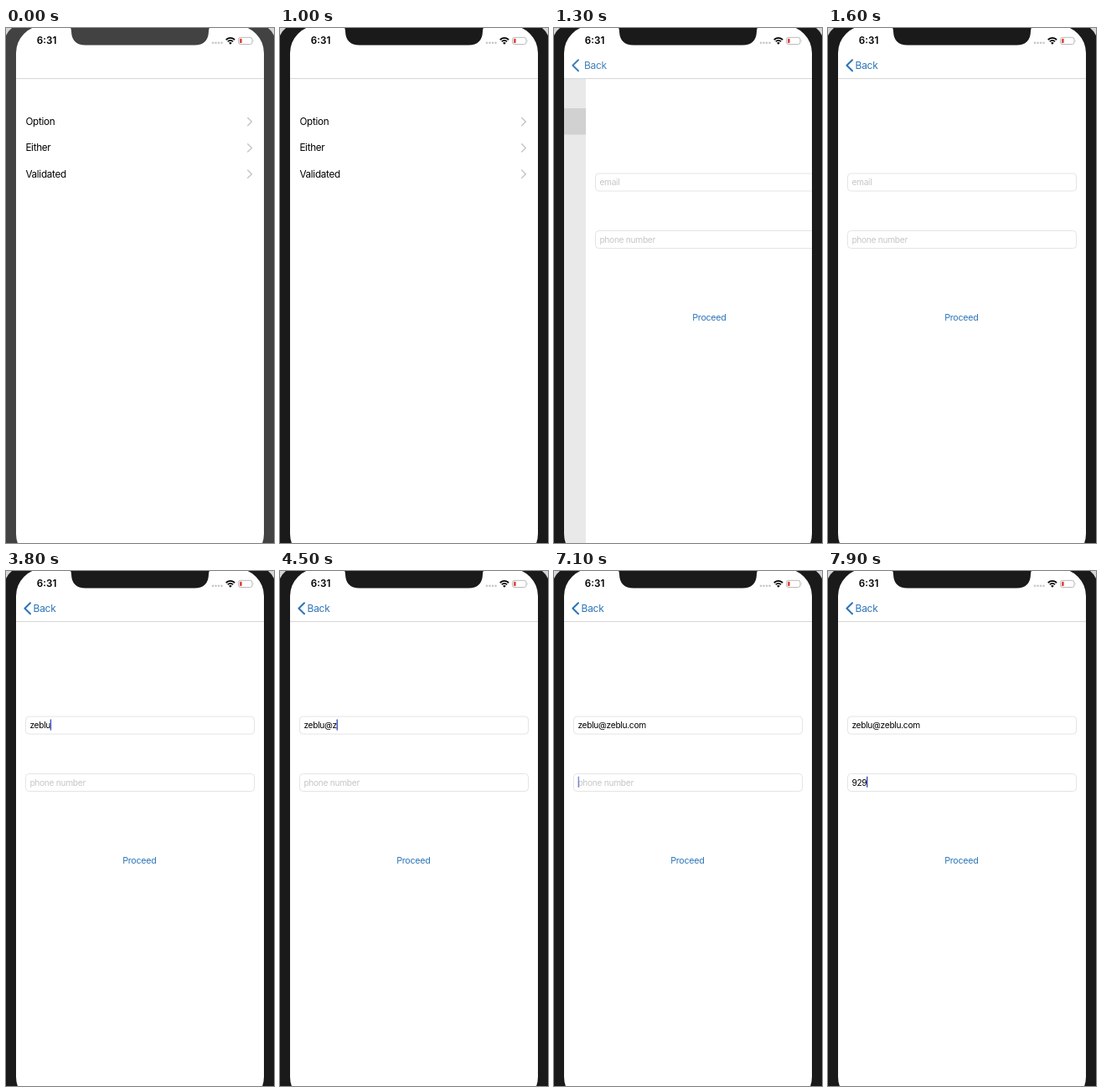
Write an HTML page that moves like this. It is 320 by 616 pixels and loops after 8000 ms.

```html
<!DOCTYPE html>
<html lang="en">
<head>
<meta charset="utf-8">
<title>Form demo</title>
<style>
  html, body { margin: 0; width: 100%; height: 100%; overflow: hidden; background: #fff; }
  svg { display: block; width: 320px; height: 616px; }
  text { font-family: Inter, "Liberation Sans", sans-serif; letter-spacing: -.3px; white-space: pre; }
  .row { font-size: 11.7px; }
  .entry { font-size: 10.2px; }
  .hint { fill: #c6c6c8; }
  .blue { fill: #2d75b6; }
  .line { fill: none; stroke-linecap: round; stroke-linejoin: round; }
  .field { fill: #fff; stroke: #e4e4e4; }
  .caret { fill: #4259c3; }
  #shell { animation: shade 8s step-end infinite; }
  @keyframes shade { 0% { fill: #424242; } 12.5% { fill: #1a1a1a; } }
</style>
</head>
<body>
<svg viewBox="0 0 320 616">
  <defs>
    <clipPath id="body"><rect x="12" y="60" width="296" height="556"/></clipPath>
    <path id="more" class="line" d="M288.7 107.5l4.7 4.6-4.7 4.6" stroke="#c4c4c8" stroke-width="1.4"/>
  </defs>
  <rect width="320" height="616" fill="#fff"/>

  <g clip-path="url(#body)">
    <g id="list">
      <rect id="pick" x="12" y="96" width="296" height="31.5" fill="#e5e5e5"/>
      <g class="row">
        <text x="23.4" y="116">Option</text>
        <text x="23.4" y="147.3">Either</text>
        <text x="23.4" y="178.7">Validated</text>
      </g>
      <use href="#more"/>
      <use href="#more" y="31.3"/>
      <use href="#more" y="62.6"/>
    </g>
    <rect id="dim" x="12" y="60" width="296" height="556"/>
    <g id="form">
      <rect x="12" y="60" width="296" height="556" fill="#fff"/>
      <rect class="field" x="23.5" y="174" width="273" height="21" rx="4"/>
      <rect class="field" x="23.5" y="242.5" width="273" height="21" rx="4"/>
      <text id="email" class="entry" x="28.4" y="187.8"></text>
      <text id="phone" class="entry" x="28.4" y="256.5"></text>
      <rect id="emailCaret" class="caret" y="177.5" width="1.5" height="13"/>
      <rect id="phoneCaret" class="caret" y="245.8" width="1.5" height="13"/>
      <text class="blue" x="139.3" y="349.8" font-size="10.7">Proceed</text>
    </g>
  </g>

  <path d="M12 60.5H308" stroke="#d6d6d6"/>
  <g id="back">
    <path class="line" d="M29 38.3l-6.6 6.4 6.6 6.6" stroke="#2d75b6" stroke-width="2"/>
    <text id="backText" class="blue" x="32.6" y="49" font-size="12">Back</text>
  </g>

  <text x="36.8" y="19.3" font-size="11.7" font-weight="600" style="letter-spacing:0">6:31</text>
  <g fill="#c6c6c6">
    <circle cx="247" cy="17.8" r="1.3"/><circle cx="250.5" cy="17.8" r="1.3"/>
    <circle cx="254" cy="17.8" r="1.3"/><circle cx="257.5" cy="17.8" r="1.3"/>
  </g>
  <path d="M262.7 14q5.2-4.4 10.4 0M264.7 16.2q3.2-2.6 6.4 0" fill="none" stroke="#000" stroke-width="1.7"/>
  <path d="M266 17.7q1.9-1.4 3.8 0l-1.9 2z"/>
  <rect x="277.5" y="11.3" width="16.5" height="8.2" rx="2.5" fill="none" stroke="#b8b8b8"/>
  <rect x="279" y="12.8" width="2.7" height="5.2" rx=".8" fill="#e3463f"/>
  <path d="M295.2 14q1.3 1.4 0 2.8z" fill="#b8b8b8"/>

  <g id="shell">
    <path fill-rule="evenodd" d="M0-9H320V650H0ZM45-3A33 33 0 0 0 12 30V605A33 33 0 0 0 45 638H275A33 33 0 0 0 308 605V30A33 33 0 0 0 275-3Z"/>
    <path d="M74-3Q78-1 78 4Q78.5 20.5 95 20.5H225Q241.500 20.500 242 4Q242-1 246-3Z"/>
  </g>
  <path d="M0 0H7Q2.500 3.500 0 9ZM320 0H313Q317.500 3.500 320 9Z" fill="#d5d5da"/>
</svg>
<script>
const $ = id => document.getElementById(id);
const LOOP = 8000, STEP = 100, PUSH = 1120;
const ADDRESS = "zeblu@zeblu.com", DIGITS = "929";

// Time of each key stroke, in ms.
const addressKeys = [3300, 3400, 3500, 3600, 3800, 4200, 4500, 4600, 4700, 4900, 5100, 5400, 5400, 5500, 5600];
const digitKeys = [7700, 7800, 7900];

const typed = (text, keys, t) => text.slice(0, keys.filter(k => k <= t).length);
const ramp = (t, from, to) => Math.min(1, Math.max(0, (t - from) / (to - from)));

// Share of the push still to go: a critically damped spring.
function pushLeft(t) {
  if (t < PUSH) return 1;
  if (t >= 1600) return 0;
  const x = (t - PUSH) * 0.0225;
  return (1 + x) * Math.exp(-x);
}

function fill(id, value, hint, caretAlpha) {
  const text = $(id), caret = $(id + "Caret");
  text.textContent = value || hint;
  text.classList.toggle("hint", !value);
  caret.setAttribute("x", 28.6 + (value ? text.getComputedTextLength() - .6 : 0));
  caret.setAttribute("opacity", caretAlpha);
}

function draw(t) {
  const left = pushLeft(t), done = 1 - left;
  $("list").setAttribute("transform", `translate(${-89 * done})`);
  $("form").setAttribute("transform", `translate(${296 * left})`);
  $("pick").setAttribute("opacity", t >= 1100 ? 1 : 0);
  $("dim").setAttribute("opacity", .094 * done);
  $("back").setAttribute("opacity", done);
  $("backText").setAttribute("x", 32.6 + 38 * left);

  const emailCaret = t < 3300 ? 0 : 1 - ramp(t, 6100, 6300);
  const phoneCaret = t < 6500 ? 0 : t < 7500 ? 1 - ramp(t, 7000, 7300) : ramp(t, 7500, 7700);
  fill("email", typed(ADDRESS, addressKeys, t), "email", emailCaret);
  fill("phone", typed(DIGITS, digitKeys, t), "phone number", phoneCaret);
}

const shade = $("shell").getAnimations()[0];
let last = -1;
function tick() {
  const now = performance.now() % LOOP;
  if (shade) shade.currentTime = now;
  const t = Math.floor(now / STEP) * STEP;
  if (t !== last) draw(last = t);
  requestAnimationFrame(tick);
}
tick();
</script>
</body>
</html>
```
